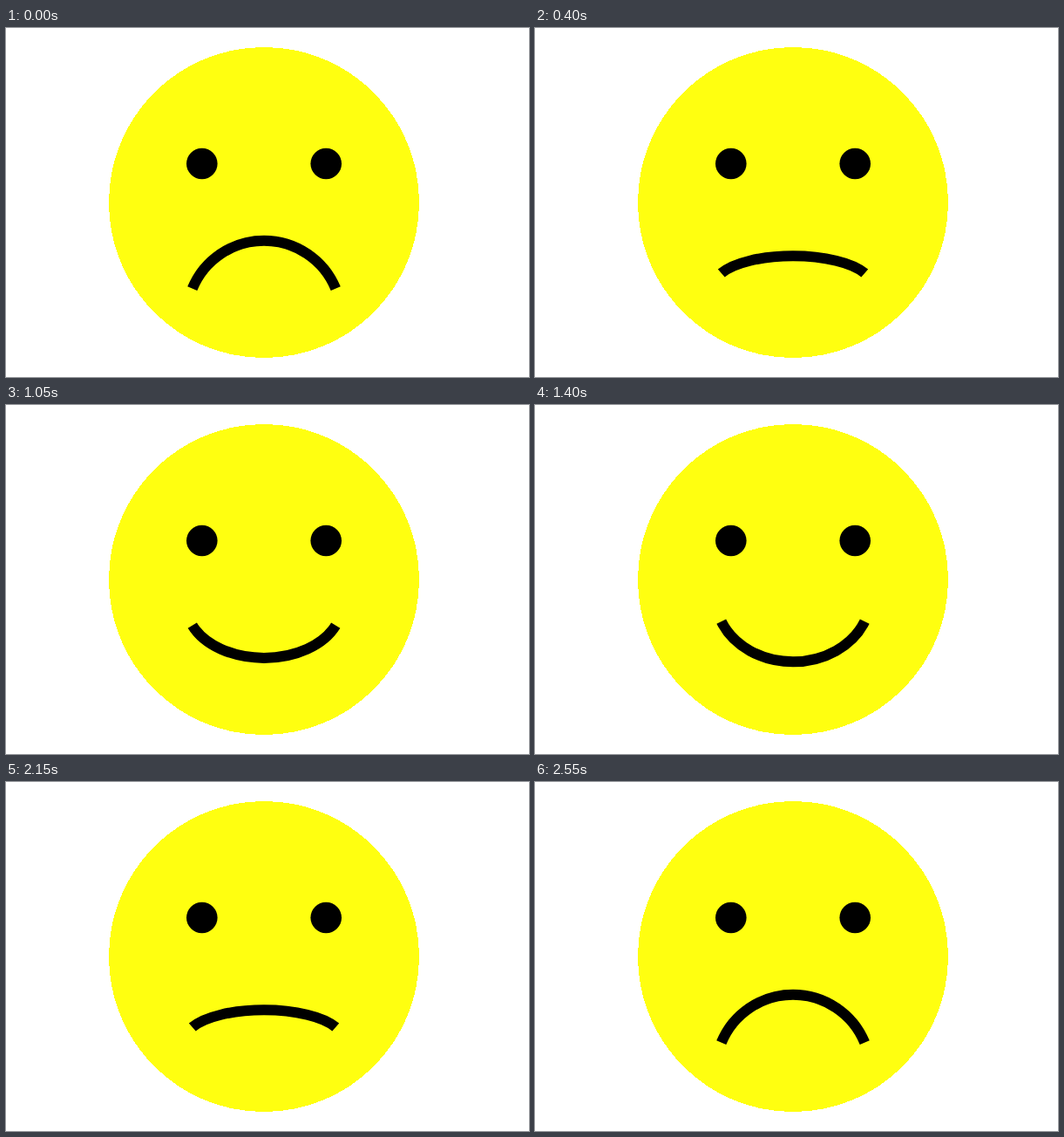
Write an HTML page that moves like this. It is 600 px wide and 400 px high and loops after 2600 ms.

```html
<!DOCTYPE html>
<html lang="en">
<head>
<meta charset="utf-8">
<title>Mood swing</title>
<style>
  html, body { margin: 0; width: 100%; height: 100%; overflow: hidden; background: #fff; }
  svg { display: block; }
</style>
</head>
<body>
<svg width="600" height="400" viewBox="0 0 600 400">
  <circle cx="296" cy="200" r="178" fill="#ffff10" shape-rendering="crispEdges"/>
  <circle cx="224.8" cy="155.5" r="17.8"/>
  <circle cx="367.2" cy="155.5" r="17.8"/>
  <path id="mouth" fill="none" stroke="#000" stroke-width="12"/>
</svg>
<script>
  const mouth = document.getElementById('mouth');
  const STEP = 50, STEPS = 52, HALF = 25;
  const CX = 296, CY = 271.2, RADIUS = 89, ANGLE = 3 * Math.PI / 8;
  const halfWidth = RADIUS * Math.sin(ANGLE);
  const halfHeight = RADIUS * (1 - Math.cos(ANGLE)) / 2;

  // bend runs from 1 (frown) to -1 (smile): an elliptic arc with a fixed angle
  function drawMouth(bend) {
    const y = CY + bend * halfHeight;
    const sweep = bend > 0 ? 1 : 0;
    mouth.setAttribute('d',
      `M${CX - halfWidth} ${y}A${RADIUS} ${RADIUS * Math.abs(bend)} 0 0 ${sweep} ${CX + halfWidth} ${y}`);
  }

  function tick() {
    const step = Math.floor(performance.now() / STEP) % STEPS;
    drawMouth(1 - 2 * Math.min(step, STEPS - 1 - step) / HALF);
    requestAnimationFrame(tick);
  }
  tick();
</script>
</body>
</html>
```
